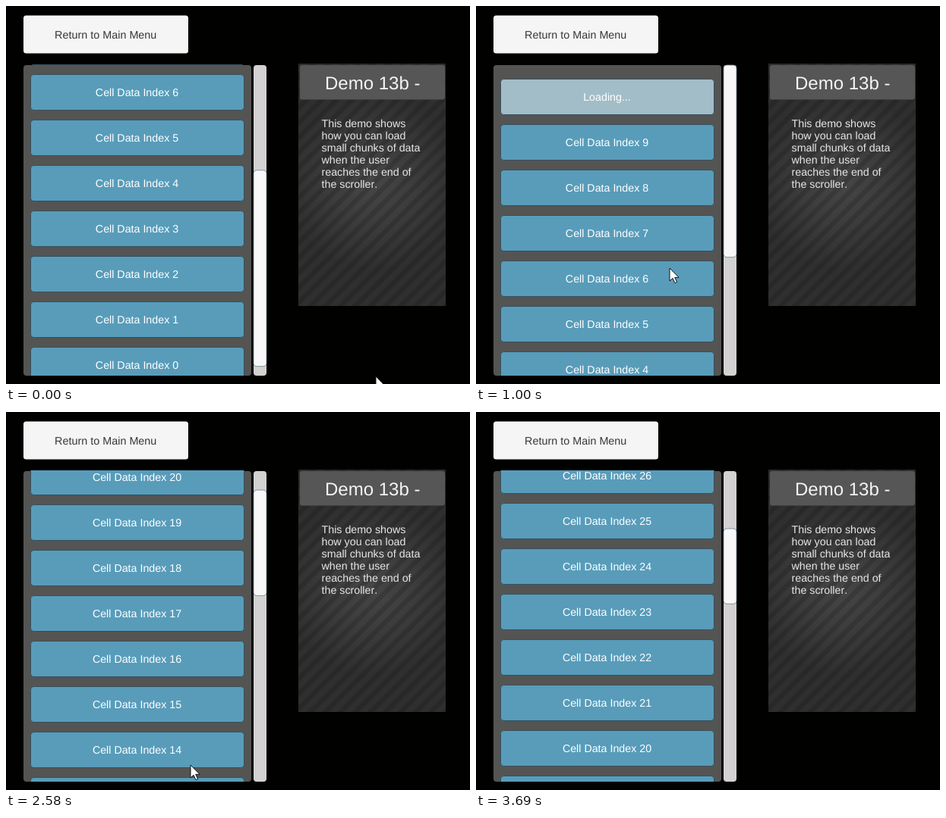
Write an HTML page that moves like this. It is 611 px wide and 499 px high and loops after 4.03 s.

```html
<!DOCTYPE html>
<html lang="en">
<head>
<meta charset="utf-8">
<title>Lazy loading scroller</title>
<style>
  html, body { margin: 0; width: 100%; height: 100%; overflow: hidden; background: #010100; }
  svg { display: block; width: 611px; height: 499px; }
  text {
    font: 14.25px Arial, "Liberation Sans", sans-serif; fill: #fff;
    font-kerning: none; text-rendering: geometricPrecision;
  }
  .mid { text-anchor: middle; }
  .cell rect { stroke: #34505e; }
</style>
</head>
<body>
<svg viewBox="0 0 611 499">
  <defs>
    <clipPath id="view"><rect x="23" y="77" width="300" height="411"/></clipPath>
    <pattern id="stripes" width="14" height="14" patternUnits="userSpaceOnUse" patternTransform="rotate(45)">
      <rect width="7" height="14" fill="#000" opacity=".1"/>
      <rect x="1" width="5" height="14" fill="#000" opacity=".06"/>
    </pattern>
    <radialGradient id="glow" gradientUnits="userSpaceOnUse" cx="483" cy="232" r="115">
      <stop offset="0" stop-color="#464646"/>
      <stop offset=".45" stop-color="#3d3d3d"/>
      <stop offset="1" stop-color="#2f2f2f"/>
    </radialGradient>
  </defs>

  <rect width="611" height="499" fill="#010100"/>
  <rect x="23" y="12.5" width="217" height="50" rx="3.5" fill="#f5f5f5"/>
  <text class="mid" x="131.2" y="42.5" style="font-size:14.4px;fill:#373737">Return to Main Menu</text>

  <rect x="23" y="78" width="300" height="410" rx="4" fill="#545453"/>
  <g id="list" clip-path="url(#view)"></g>
  <rect x="326" y="78" width="17" height="410" rx="4" fill="#d3d1d1"/>
  <rect id="handle" x="326" width="17" rx="4" fill="#f9f8f8" stroke="#65838f" stroke-width=".8"/>

  <rect x="385" y="76" width="194" height="320" fill="url(#glow)"/>
  <rect x="385" y="76" width="194" height="320" fill="url(#stripes)"/>
  <rect x="387" y="78" width="191" height="45.5" rx="3" fill="#565656"/>
  <text class="mid" x="482.7" y="110" style="font-size:24px;fill:#f4f4f4">Demo 13b -</text>
  <g id="info"></g>

  <circle id="press" r="12" fill="#a9c75c"/>
  <path id="cursor" d="M0 0V17L4 13.3L7 19.7L9.6 18.5L6.7 12.3H12Z" fill="#fff" stroke="#111"/>
</svg>
<script>
const LOOP = 4030, STEP = 63.5, START = 37;
const TOP = 78, VIEW = 410, PITCH = 60, PAD = 33;
const LOADS = [1775, 3690], COUNTS = [10, 21, 32];
const PULLS = [{ start: 482, length: 432 }, { start: 2256, length: 480 }];
const OVERSHOOT = 14, SETTLE = 170, LOAD_SHIFT = 273;

// Pointer stops: time, x, y
const POINTER = [
  [START, 487, 489], [482, 301, 277], [800, 276, 446], [990, 255, 346], [1650, 246, 191],
  [2230, 246, 191], [2577, 243, 466], [2831, 244, 490], [2930, 244, 502]
];

const $ = id => document.getElementById(id);
const ease = u => (1 - Math.cos(Math.PI * u)) / 2;
const mix = (a, b, u) => a + (b - a) * u;

// The list holds every cell plus the loading cell.
const size = count => (count + 1) * PITCH + 6;

function set(el, attrs) {
  for (const key in attrs) el.setAttribute(key, attrs[key]);
}

function add(parent, tag, attrs) {
  const el = document.createElementNS("http://www.w3.org/2000/svg", tag);
  set(el, attrs);
  return parent.appendChild(el);
}

// The picture advances in even steps.
function hold(t) {
  return Math.max(0, START + Math.floor((t - START) / STEP) * STEP);
}

// Distance from the bottom: pull past the end, then spring back.
function scrollAt(t, page) {
  const from = page ? size(COUNTS[page - 1]) - VIEW + LOAD_SHIFT : 19;
  const pull = PULLS[page];
  if (!pull || t < pull.start) return from;
  const rest = size(COUNTS[page]) - VIEW;
  const u = (t - pull.start) / pull.length;
  if (u < 1) return mix(from, rest + OVERSHOOT, ease(u));
  return rest + OVERSHOOT * Math.exp(-(t - pull.start - pull.length) / SETTLE);
}

function pointerAt(t) {
  const next = POINTER.findIndex(p => p[0] > t);
  if (next < 0) return POINTER.at(-1).slice(1);
  if (next === 0) return POINTER[0].slice(1);
  const [t0, x0, y0] = POINTER[next - 1], [t1, x1, y1] = POINTER[next];
  const u = ease((t - t0) / (t1 - t0));
  return [mix(x0, x1, u), mix(y0, y1, u)].map(Math.round);
}

["This demo shows", "how you can load", "small chunks of data", "when the user",
 "reaches the end of", "the scroller."].forEach((line, i) => {
  add($("info"), "text", { x: 415.5, y: 160 + i * 16, style: "fill:#e6e6e6" }).textContent = line;
});

const cells = Array.from({ length: 9 }, () => {
  const g = add($("list"), "g", { class: "cell" });
  const box = add(g, "rect", { x: 32.5, y: -23.5, width: 281, height: 47, rx: 4 });
  const label = add(g, "text", { class: "mid", x: 172.5, y: 5 });
  return { g, box, label };
});

function drawList(scroll, count) {
  const base = TOP + VIEW + Math.round(scroll) - PAD;
  const first = Math.max(0, Math.floor((scroll - PAD) / PITCH));
  cells.forEach(({ g, box, label }, i) => {
    const index = first + i, loading = index === count;
    set(g, { transform: `translate(0 ${base - index * PITCH})`, display: index > count ? "none" : "inline" });
    set(box, { fill: loading ? "#a2bdc8" : "#589cba" });
    const text = loading ? "Loading..." : "Cell Data Index " + index;
    if (label.textContent !== text) label.textContent = text;
  });
}

// The handle shrinks when the list is pulled past its end.
function drawHandle(scroll, total) {
  const max = total - VIEW, inside = Math.min(scroll, max);
  set($("handle"), {
    y: TOP + 390 * (max - inside) / total,
    height: 390 * (VIEW - scroll + inside) / total + 18.8
  });
}

function drawPointer(t) {
  const [x, y] = pointerAt(t);
  const pressed = PULLS.some(p => t > p.start && t < p.start + 260);
  set($("cursor"), { transform: `translate(${x} ${y})` });
  set($("press"), { cx: x, cy: y, display: pressed ? "inline" : "none" });
}

function draw(time) {
  const t = hold(time);
  const page = LOADS.filter(load => time >= load).length;
  const scroll = scrollAt(t, page);
  drawList(scroll, COUNTS[page]);
  drawHandle(scroll, size(COUNTS[page]));
  drawPointer(t);
}

const begin = performance.now();
function tick() {
  draw((performance.now() - begin) % LOOP);
  requestAnimationFrame(tick);
}
tick();
</script>
</body>
</html>
```
